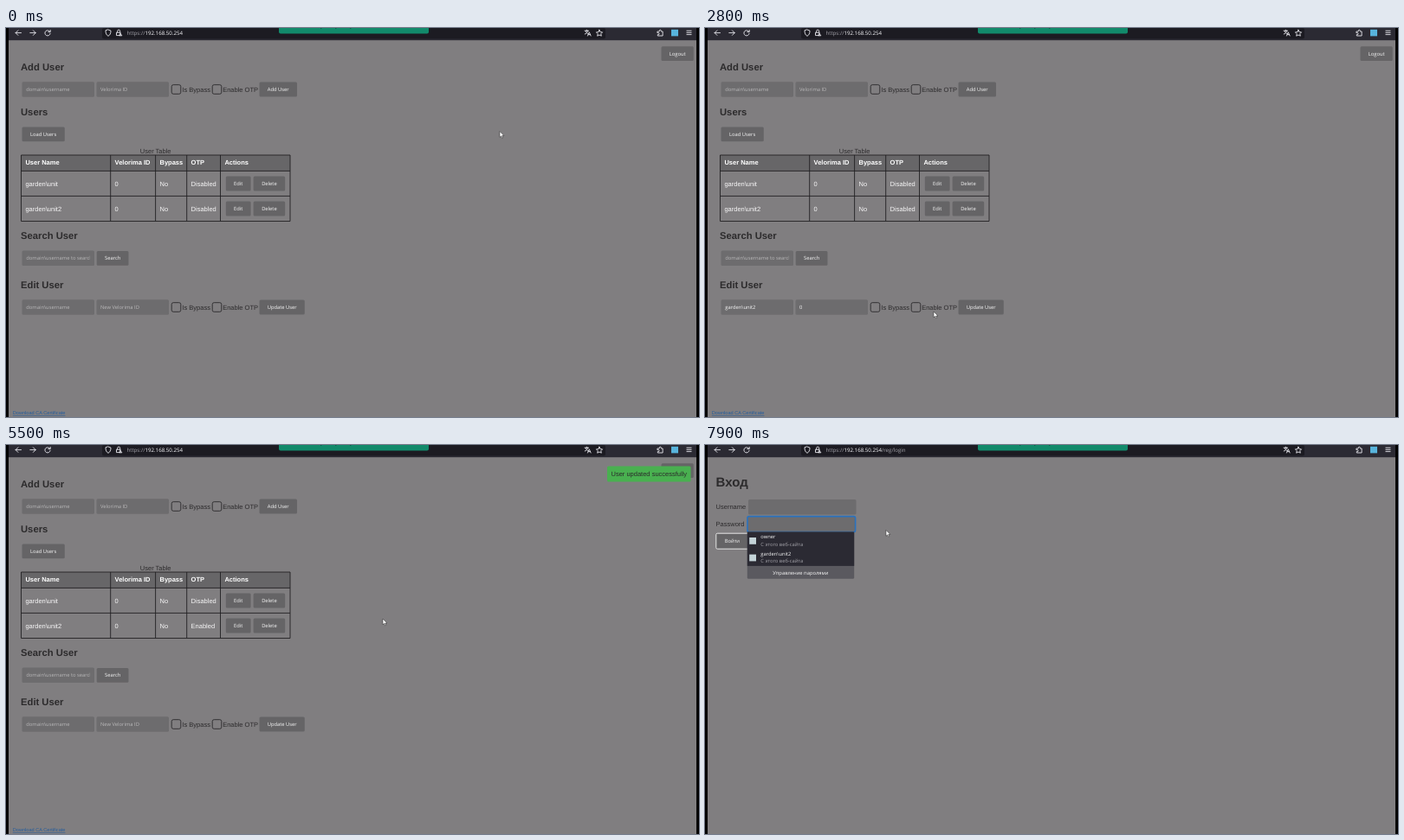
An HTML page that plays this animation: 800 by 450 pixels, repeating every 8 s.

```html
<!DOCTYPE html>
<html lang="en">
<head>
<meta charset="utf-8">
<title>User panel</title>
<style>
  html, body { margin: 0; width: 100%; height: 100%; overflow: hidden; background: #000; }
  svg { display: block; }
  #stage { width: 800px; height: 450px; }
  text { font: 7.5px "Liberation Sans", Arial, sans-serif; fill: #2c2b2c; white-space: pre; text-rendering: geometricPrecision; }
  .h2 { font-size: 11.25px; font-weight: 700; }
  .h1 { font-size: 15px; font-weight: 700; }
  .th { font-weight: 700; fill: #fff; }
  .td { fill: #f6f6f6; }
  .ui { font: 5.8px "Open Sans", "Noto Sans", sans-serif; fill: #f8f8f8; }
  .hint { fill: #b9b8b9; }
  .mid { text-anchor: middle; }
  .url { font-size: 6.15px; fill: #fbfbfe; }
  .dim { fill: #a3a2a9; }
  .link { font-size: 5.6px; fill: #245d9b; text-decoration: underline; }
  .icon { fill: none; stroke: #e8e8ee; stroke-width: .9; stroke-linecap: round; stroke-linejoin: round; }
</style>
</head>
<body>
<svg id="stage" viewBox="0 0 800 450"></svg>
<script>
const LOOP = 8000, STEP = 100;
const FILLED = 1600, CHECKED = 3500, SAVED = 5000, LOGIN = 7600;

const rect = (x, y, w, h, fill, more = '') =>
  `<rect x="${x}" y="${y}" width="${w}" height="${h}" fill="${fill}" ${more}/>`;
const text = (x, y, s, cls = '') => `<text x="${x}" y="${y}" class="${cls}">${s}</text>`;
const icon = (x, y, d) => `<path class="icon" transform="translate(${x} ${y})" d="${d}"/>`;
const group = (id, body) => `<g id="${id}">${body}</g>`;

const button = (x, y, w, label) =>
  rect(x, y, w, 16.8, '#656466', 'rx="1.5"') + text(x + w / 2, y + 10.5, label, 'ui mid');
const field = (x, y, w = 83.5) => rect(x, y, w, 17.6, '#6d6c6e', 'rx="1.5"');
const hint = (x, y, s) => text(x, y, s, 'ui hint');
const box = (x, y) =>
  rect(x, y, 10.6, 10.6, 'none', 'rx="2" stroke="#323133" stroke-width="1"');

function toolbar() {
  return rect(3, 0, 794, 14.2, '#2b2a33') + rect(111, 0, 581, 12.4, '#1c1b22', 'rx="2"') +
    icon(14.3, 5.6, 'M3.2 0H-3.2M-.4-2.8L-3.2 0L-.4 2.8') +
    icon(31, 5.6, 'M-3.2 0H3.2M.4-2.8L3.2 0L.4 2.8') +
    icon(48, 5.8, 'M2.8-1.4A3.1 3.1 0 1 0 3.1.6M3.2-3.4V-1.2H1') +
    icon(118, 5.6, 'M0-3.6L3-2.5C3 .8 2 2.6 0 3.7C-2 2.6-3 .8-3-2.5Z') +
    icon(130.5, 5.6, 'M-2.6-.4H1.6V3H-2.6ZM-1.8-.6V-2A1.5 1.5 0 0 1 1.2-2V-.6M1.6 1L3.4 3.2H.6Z') +
    icon(671.5, 5.6, 'M-3.4-2.4H1M-1.2-3.4V-2.4M.2-2.4C-.4-.4-1.6.8-3.2 1.4M-2.4-2C-2-.6-1 .4 0 .8M0 3.4L1.8-.8L3.6 3.4M.7 2H2.9') +
    icon(685, 5.8, 'M0-3.6L1.1-1.2L3.6-.9L1.8.9L2.3 3.4L0 2.2L-2.3 3.4L-1.8.9L-3.6-.9L-1.1-1.2Z') +
    icon(755.3, 5.8, 'M-3-1.8H-1V-2.6A1 1 0 0 1 1-2.6V-1.8H2.8V3.2H-3V1.8H-2.2A1 1 0 0 0-2.2-.2H-3Z') +
    rect(768, 1.8, 8, 7.6, '#58b4dc') +
    icon(788.5, 5.4, 'M-2.6-2.2H2.6M-2.6 0H2.6M-2.6 2.2H2.6') +
    `<text x="139.5" y="8" class="ui url"><tspan class="dim">https://</tspan>192.168.50.254<tspan id="path" class="dim">/reg/login</tspan></text>` +
    rect(315, -5, 173, 11.6, '#128a6b', 'rx="2"') +
    [363, 380, 397].map(x => rect(x, 0, 1.4, .8, '#0b5745')).join('');
}

// One line of the add / edit form, centred on y
function formRow(y, label, width, values) {
  return field(18.5, y - 8.8) + field(104.5, y - 8.8) + values +
    box(191.2, y - 5.3) + text(203.4, y + 2.7, 'Is Bypass') +
    box(238.2, y - 5.3) + text(250.2, y + 2.7, 'Enable OTP') +
    button(292.5, y - 8.4, width, label);
}
const hints = (y, second) => hint(23.3, y + 2.1, 'domain\\username') + hint(109, y + 2.1, second);

function table() {
  const cols = [17.5, 120.7, 172.6, 208.7, 247.5, 328];
  const heads = ['User Name', 'Velorima ID', 'Bypass', 'OTP', 'Actions'];
  const row = (y, name, otp) =>
    [name, '0', 'No', otp].map((s, i) => text(cols[i] + 4.9, y + 2.7, s, 'td')).join('') +
    button(253.8, y - 8.4, 28.8, 'Edit') + button(285.6, y - 8.4, 36.6, 'Delete');
  return text(172.7, 144.8, 'User Table', 'mid') + rect(17.5, 147, 310.5, 18.4, '#676668') +
    heads.map((s, i) => text(cols[i] + 4.9, 158.4, s, 'th')).join('') +
    row(180, 'garden\\unit', 'Disabled') + row(209, 'garden\\unit2', '<tspan id="otp"></tspan>') +
    `<path fill="none" stroke="#222123" stroke-width=".9" d="${cols.map(x => `M${x} 147V223.5`).join('')}${
      [147, 165.4, 194.4, 223.5].map(y => `M17.5 ${y}H328`).join('')}"/>`;
}

function panel() {
  return text(17, 49, 'Add User', 'h2') +
    formRow(71, 'Add User', 43.5, hints(71, 'Velorima ID')) +
    text(17, 101.3, 'Users', 'h2') + button(18.5, 114.5, 49.3, 'Load Users') + table() +
    text(17, 244, 'Search User', 'h2') + field(18.5, 257.4) +
    `<svg x="23.3" y="258" width="73.8" height="16">${hint(0, 10.3, 'domain\\username to search')}</svg>` +
    button(104.7, 257.9, 36.8, 'Search') +
    text(17, 301, 'Edit User', 'h2') +
    formRow(323, 'Update User', 52.3,
      group('empty', hints(323, 'New Velorima ID')) +
      group('values', text(23.3, 325.1, 'garden\\unit2', 'ui') + text(109, 325.1, '0', 'ui'))) +
    group('check', rect(238.2, 317.7, 10.6, 10.6, '#6a696b', 'rx="2" stroke="#323133"') +
      '<path d="M241 323.2L242.8 325.3L246.2 320.5" fill="none" stroke="#fff" stroke-width="1.2"/>') +
    button(756.5, 21.2, 37.3, 'Logout') +
    text(7.8, 447, 'Download CA Certificate', 'link') +
    group('toast', rect(694, 24.4, 96.5, 18, '#49b050', 'rx="1.5"') +
      text(742.3, 36.2, 'User updated successfully', 'mid'));
}

function login() {
  const entry = (y, name) => rect(51.2, y, 7.8, 7.8, '#c3d3d8') +
    text(64.3, y + 1.2, name, 'ui') + text(64.3, y + 9.6, 'С этого веб-сайта', 'ui dim');
  return text(12.6, 48, 'Вход', 'h1') +
    text(12.6, 74.2, 'Username') + field(50, 63, 124.5) +
    text(12.6, 94.4, 'Password') +
    rect(49, 82.6, 124.6, 18, '#6d6c6e', 'rx="1.8" stroke="#2a72bd" stroke-width="1.6"') +
    rect(12.8, 102.2, 38, 18, '#656466', 'rx="1.5" stroke="#e6e6e6" stroke-width="1"') +
    text(31.4, 113.3, 'Войти', 'ui mid') +
    rect(48.8, 100.5, 123.4, 54.3, '#5a595f', 'rx="1.5"') + rect(48.8, 100.5, 123.4, 39.4, '#2b2a33') +
    entry(107, 'owner') + entry(126.6, 'garden\\unit2') +
    text(110.3, 149.8, 'Управление паролями', 'ui mid');
}

const cursor = group('arrow',
    '<path d="M0 0V6.8L1.6 5.4L2.7 7.9L3.8 7.4L2.7 5H4.9Z" fill="#fff" stroke="#222" stroke-width=".5"/>') +
  group('hand',
    '<path d="M0 .6C0-.3 1.3-.3 1.3.6V3L4.2 3.6C4.9 3.8 5 4.2 4.9 4.8L4.4 8.2H.8L-1.4 5.2C-1.8 4.5-1 4-.4 4.6L0 5Z" fill="#fff" stroke="#222" stroke-width=".5"/>');

document.getElementById('stage').innerHTML =
  rect(0, 0, 800, 450, '#000') + rect(3, 14, 794, 436, '#807e80') + toolbar() +
  group('panel', panel()) + group('login', login()) + group('cursor', cursor);

// time, x, y of the pointer tip
const track = [
  [0, 570, 119.6], [200, 552, 124], [800, 340.5, 183.5], [1300, 268, 208], [1800, 268, 209],
  [2300, 282, 272], [2700, 264, 328], [2900, 264, 328], [3300, 243, 323], [3800, 243, 323],
  [4500, 283, 327], [4600, 303.4, 326], [4900, 304, 326], [5400, 435, 201], [5700, 435, 201],
  [6600, 330, -12], [7500, 330, -12], [7600, 150, 92], [7800, 209, 98.5], [8000, 209, 98.5]
];

function pointer(t) {
  const i = track.findIndex(p => p[0] > t);
  const [t0, x0, y0] = track[i - 1], [t1, x1, y1] = track[i];
  const k = (t - t0) / (t1 - t0), e = k * k * (3 - 2 * k);
  return [x0 + (x1 - x0) * e, y0 + (y1 - y0) * e];
}

const el = id => document.getElementById(id);
const show = (id, on) => { el(id).style.display = on ? '' : 'none'; };
const inside = (x, y, l, t, w) => x > l && x < l + w && y > t && y < t + 16.8;

function draw(t) {
  const [x, y] = pointer(t), out = t >= LOGIN, saved = t >= SAVED;
  const editing = t >= FILLED && !saved;
  const onButton = !out && (inside(x, y, 292.5, 314.6, 52.3) || inside(x, y, 253.8, 200.6, 28.8));
  show('panel', !out);
  show('login', out);
  show('path', out);
  show('toast', saved);
  show('values', editing);
  show('empty', !editing);
  show('check', editing && t >= CHECKED);
  show('hand', onButton);
  show('arrow', !onButton);
  el('otp').textContent = saved ? 'Enabled' : 'Disabled';
  el('cursor').setAttribute('transform', `translate(${x} ${y})`);
}

const start = performance.now();
function tick() {
  const t = (performance.now() - start) % LOOP;
  draw(Math.floor(t / STEP) * STEP);
  requestAnimationFrame(tick);
}
tick();
</script>
</body>
</html>
```
